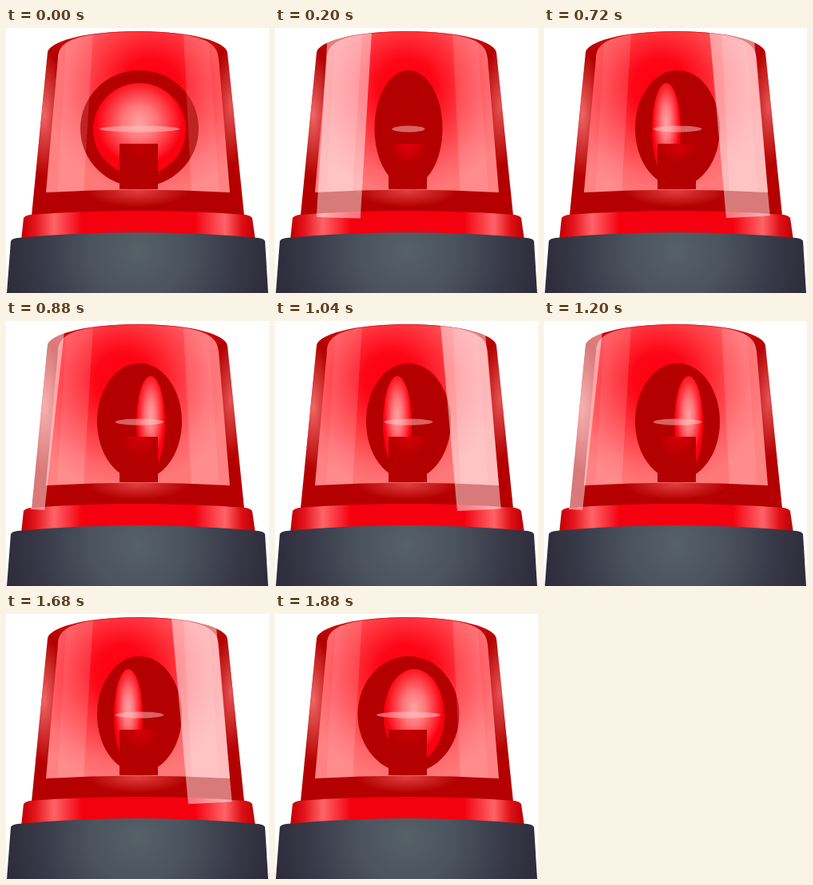
Write an HTML page with a canvas that moves like this. It is 329 px wide and 332 px high and loops after 1920 ms.

```html
<!DOCTYPE html>
<html lang="en">
<head>
<meta charset="utf-8">
<title>Rotating beacon</title>
<style>
html, body { margin: 0; width: 100%; height: 100%; overflow: hidden; background: #fff; }
canvas { display: block; width: 329px; height: 332px; }
</style>
</head>
<body>
<canvas id="stage" width="329" height="332"></canvas>
<script>
const ctx = document.getElementById('stage').getContext('2d');
const STEP = 40, STEPS = 8;
const DARK = '#b40000';

const dome = new Path2D('M52 31 C53 18 95 4 165 4 C235 4 276 18 277 31 L298 235 Q165 225 32 235 Z');
const shell = new Path2D('M52 31 C53 18 95 4 165 4 C235 4 276 18 277 31 L299 234 Q238 239 165 239 Q92 239 31 236 Z');
const pane = new Path2D('M65 38 C66 16 86 6 165 5 C244 6 264 16 266 38 L280 206 Q165 199 50 206 Z');
const ring = new Path2D('M22 238 Q24 235 30 234 Q165 224 300 234 Q306 235 308 238 L312 266 L19 266 Z');
const base = new Path2D('M6 267 Q7 264 14 263 Q165 249 316 263 Q323 264 324 267 L328 332 L1 332 Z');
const stand = new Path2D('M142 145 H190 V202 H142 Z');

function stops(g, list) {
  list.forEach(([at, color]) => g.addColorStop(at, color));
  return g;
}
const linear = (x0, x1, ...list) => stops(ctx.createLinearGradient(x0, 0, x1, 0), list);
const radial = (x, y, r, ...list) => stops(ctx.createRadialGradient(x, y, 0, x, y, r), list);

function fill(path, style) {
  ctx.fillStyle = style;
  ctx.fill(path);
}
function oval(x, y, rx, ry, style) {
  const p = new Path2D();
  p.ellipse(x, y, rx, ry, 0, 0, Math.PI * 2);
  fill(p, style);
}
function quad(a, b, c, d, top, bottom, style) {
  const p = new Path2D();
  p.moveTo(a, top);
  p.lineTo(b, top);
  p.lineTo(c, bottom);
  p.lineTo(d, bottom);
  fill(p, style);
}
function clipped(path, draw) {
  ctx.save();
  ctx.clip(path);
  draw();
  ctx.restore();
}
function glow(x, y, rx, ry, color, alpha) {
  ctx.save();
  ctx.translate(x, y);
  ctx.scale(rx, ry);
  ctx.globalAlpha = alpha;
  ctx.fillStyle = radial(0, 0, 1, [0, color], [1, color + '00']);
  ctx.fillRect(-1, -1, 2, 2);
  ctx.restore();
}

function drawDome(cx) {
  fill(dome, DARK);
  clipped(dome, () => {
    glow(165, 12, 125, 36, '#ff2a30', 0.9);
    glow(48, 108, 26, 80, '#ff8080', 0.8);
    glow(281, 98, 22, 75, '#ff8080', 0.65);
    glow(165, 204, 65, 20, '#ff6a6a', 0.6);
  });
  fill(pane, radial(cx, 74, 135,
    [0, '#ff0010'], [0.26, '#fd0616'], [0.55, '#ff3a42'], [0.82, '#ff666a'], [1, '#ff7878']));
}

function drawStreaks() {
  clipped(pane, () => {
    quad(76, 109, 97, 64, 6, 206, 'rgba(255,255,255,.14)');
    quad(222, 253, 267, 232, 6, 206, 'rgba(255,255,255,.14)');
    quad(40, 76, 64, 40, 6, 206, 'rgba(255,255,255,.07)');
    quad(253, 285, 285, 267, 6, 206, 'rgba(255,255,255,.07)');
  });
}

function drawLamp(phase) {
  const back = Math.min(phase, STEPS - phase);
  const side = phase < STEPS / 2 ? -1 : 1;
  oval(167, 126, 74 - 10.5 * back, 73, DARK);

  const rx = 58 - 20 * back;
  if (rx > 0) {
    ctx.save();
    ctx.translate(167 + side * 7 * back, 127);
    ctx.scale(rx / 58, 1);
    oval(0, 0, 58, 58, radial(0, -9, 60,
      [0, '#ffa2a2'], [0.35, '#ff767a'], [0.7, '#ff2c36'], [0.9, '#fb0010']));
    ctx.restore();
  }
  fill(stand, DARK);
  clipped(stand, () => {
    const alpha = 0.03 + 0.03 * back;
    for (let r = 22; r > 3; r -= 4) oval(167, 146, r, r, `rgba(255,0,22,${alpha})`);
  });
  oval(167, 126.5, 50 - 9.8 * back, 4, 'rgba(255,205,205,.48)');
}

function drawRing() {
  fill(ring, linear(19, 312, [0, '#c00004'], [0.06, '#e4141c'], [0.14, '#ff6468'], [0.26, '#f4000f'],
    [0.74, '#f4000f'], [0.87, '#ff6468'], [0.94, '#e01016'], [1, '#b80004']));
}

function drawBase() {
  fill(base, radial(165, 280, 165, [0, '#566067'], [0.35, '#4b545f'], [0.75, '#383948'], [1, '#2f2c3b']));
}

// The reflection crosses the shell from right to left, seen through its outline only.
function drawSheen(phase) {
  const top = 301 - 47 * phase, low = 345.5 - 58.75 * phase;
  clipped(shell, () => quad(top, top + 55, low + 55, low, 4, 239, 'rgba(255,255,255,.48)'));
}

function draw(now) {
  const phase = Math.floor(now / STEP) % STEPS;
  ctx.clearRect(0, 0, 329, 332);
  drawDome(164 + 18 * Math.cos(phase * Math.PI / 2));
  drawLamp(phase);
  drawStreaks();
  drawRing();
  drawSheen(phase);
  drawBase();
}

const start = performance.now();
function tick() {
  draw(performance.now() - start);
  requestAnimationFrame(tick);
}
tick();
</script>
</body>
</html>
```
